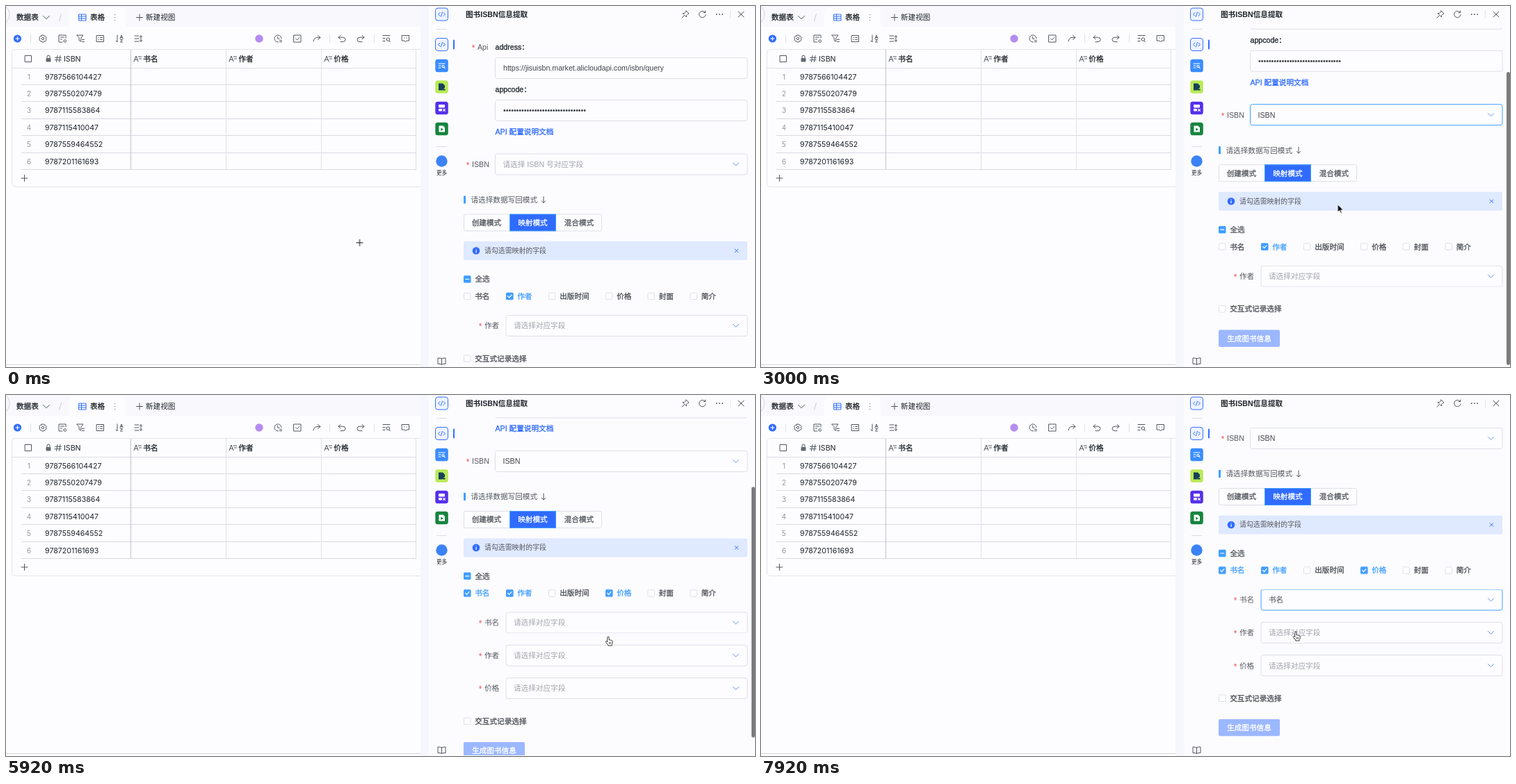
An HTML page that plays this animation: 1077 by 520 pixels, repeating every 8000 ms.

```html
<!DOCTYPE html>
<html lang="zh-CN">
<head>
<meta charset="utf-8">
<title>图书ISBN信息提取</title>
<style>
html, body { margin: 0; width: 100%; height: 100%; overflow: hidden; background: #fcfcff; }
svg { display: block; width: 1077px; height: 520px; }
text { font: 10.64px "Liberation Sans", "Noto Sans CJK SC", "Noto Sans CJK", sans-serif; color: #55585e; fill: currentColor; white-space: pre; }
.left text { font-family: Inter, "Noto Sans CJK SC", "Noto Sans CJK", sans-serif; color: #1f2329; }
.left .idx { font-size: 9.9px; color: #8f959e; }
.mid { text-anchor: middle; }
/* a thin outline gives the CJK glyphs a medium weight */
.med, .item text { stroke: currentColor; stroke-width: .3px; }
text.dark { color: #1f2329; }
text.title { color: #1f2329; font-weight: 600; }
text.link { color: #2f6bff; }
text.white { color: #fff; }
text.req { color: #f56c6c; }
text.hint { color: #a0a3aa; }
text.value { color: #404349; }
text.small { font-size: 9.88px; }
text.tiny { font-size: 7.6px; color: #1f2329; }
.box { fill: #fdfdff; stroke: #dcdfe6; }
.icon { fill: none; stroke: #51565d; stroke-linecap: round; stroke-linejoin: round; }
.blue { stroke: #3370ff; }
.pale { stroke: #fff; stroke-width: 1.2; }
.caret { fill: none; stroke: #5b8cf0; stroke-linecap: round; stroke-linejoin: round; }
.item { color: #4b4e54; }
.item text { color: inherit; }
.item.picked { color: #409eff; }
.menu { filter: drop-shadow(0 1.5px 4px rgba(0, 0, 0, .14)); }
.thumb { fill: #7b7b7e; }
</style>
</head>
<body>
<script>
const LOOP = 8000, ROW = 47.3;

// Timeline: every track becomes one CSS keyframes rule, stops are [ms, value].
const tracks = {};
let css = '', count = 0;
function track(sel, prop, stops, ease = 'step-end') {
  const name = `k${count++}`;
  const all = [...stops, [LOOP, stops[stops.length - 1][1]]];
  css += `@keyframes ${name}{${all.map(([ms, v]) => `${ms / LOOP * 100}%{${prop}:${v}}`).join('')}}\n`;
  (tracks[sel] ??= []).push(`${name} ${LOOP}ms ${ease} infinite`);
}
const shown = (sel, from, to = LOOP) =>
  track(sel, 'opacity', [[0, from ? 0 : 1], ...(from ? [[from, 1]] : []), ...(to < LOOP ? [[to, 0]] : [])]);

// Drawing helpers; text y is the middle of the line.
const text = (x, y, s, cls = '') => `<text x="${x}" y="${y + 3.9}" class="${cls}">${s}</text>`;
const rect = (x, y, w, h, fill, rx = 0, more = '') =>
  `<rect x="${x}" y="${y}" width="${w}" height="${h}" rx="${rx}" fill="${fill}" ${more}/>`;
const line = (d, stroke) => `<path d="${d}" stroke="${stroke}" fill="none"/>`;
const icon = (x, y, d, cls = '') => `<path class="icon ${cls}" transform="translate(${x} ${y})" d="${d}"/>`;
const dot = (x, y, r, fill) => `<circle cx="${x}" cy="${y}" r="${r}" fill="${fill}"/>`;
const ring = r => `M${-r} 0a${r} ${r} 0 1 0 ${2 * r} 0a${r} ${r} 0 1 0 ${-2 * r} 0`;
const frame = 'M-5-5h10v10h-10z';
const plus = 'M-4.5 0h9M0-4.5v9';

function select(x, y, name, hint, value) {
  return `<g class="${name}"><rect class="box" x="${x + .5}" y="${y - 15}" width="${1065.5 - x}" height="30" rx="3"/>
    ${text(x + 11.5, y, hint, 'hint')}${value ? text(x + 11.5, y, value, 'value') : ''}
    <g transform="translate(1049.5 ${y})"><path class="caret" d="M-4-2l4 4 4-4"/></g></g>`;
}
const input = (y, value) => rect(703.5, y - 15, 362.5, 30, '#fdfdff', 3, 'stroke="#dcdfe6"') + text(715, y, value, 'value');
const label = (x, y, s) => text(x - 8, y + 1, '*', 'req med') + text(x, y, s);
const mapRow = (y, name, s, value) =>
  `<g class="row-${name}">${label(688, y, s)}${select(718.5, y, name, '请选择对应字段', value)}</g>`;

function check(x, y, s, name = '', picked = false) {
  const tick = name || picked
    ? `<g class="tick">${rect(x, y - 5.2, 10.5, 10.5, '#409eff', 1.5)}${icon(x + 5.2, y, 'M-2.6 0l2 2 3.4-3.8', 'pale')}</g>` : '';
  return `<g class="item ${name} ${picked ? 'picked' : ''}">
    ${rect(x + .5, y - 4.7, 9.5, 9.5, '#fff', 1.5, 'stroke="#dcdfe6"')}${tick}${text(x + 16.2, y, s)}</g>`;
}

function menu(left, top, name) {
  const w = 1068 - left, x = -w / 2;
  return `<g transform="translate(${left + w / 2} ${top})"><g class="menu ${name}">
    <path d="M${x} 2q0-2 2-2h${w / 2 - 6.5}l4.5-4.5 4.5 4.5h${w / 2 - 6.5}q2 0 2 2v109.5q0 2-2 2h${4 - w}q-2 0-2-2z" fill="#fdfdff" stroke="#e4e7ed" stroke-width=".8"/>
    <rect class="hover" x="${x + .5}" y="5" width="${w - 1}" height="25.85" fill="#f4f7fc"/>
    ${['ISBN', '书名', '作者', '价格'].map((s, i) => text(x + 16, 18.2 + i * 25.85, s)).join('')}</g></g>`;
}

function sheet() {
  const isbns = [9787566104427, 9787550207479, 9787115583864, 9787115410047, 9787559464552, 9787201161693];
  const mid = i => 101.7 + i * 24.4;
  let s = rect(0, 0, 608, 31, '#f8f8fd') + rect(0, 30, 596, 490, '#fdfdff') + rect(596, 0, 12, 520, '#f6f7fc')
    + '<path d="M85 31q6 0 6-6V8q0-6 6-6h69q6 0 6 6v17q0 6 6 6z" fill="#fdfdff"/>'
    + line('M0 1q5 4 5 11t-5 12', '#d5d7dc')
    + text(15, 16.5, '数据表', 'med') + icon(58, 16.5, 'M-4.5-2.2l4.5 4.5 4.5-4.5')
    + line('M76.5 22l3-11', '#c9ccd2')
    + icon(110, 16.5, 'M-5-4.5h10v9h-10zM-5-1.5h10M-5 1.5h10M-1.5-4.5v9', 'blue') + text(121, 16.5, '表格', 'med')
    + [-4, 0, 4].map(d => dot(156.5, 16.5 + d, .8, '#8f959e')).join('')
    + icon(192, 16.5, plus) + text(201, 16.5, '新建视图');

  s += dot(16.5, 47, 5.6, '#2f6bff') + icon(16.5, 47, 'M-2.5 0h5M0-2.5v5', 'pale')
    + line('M35.5 41v12M465.5 41v12M529.5 41v12', '#dee0e3')
    + icon(53, 47, 'M-1.4-5h2.8l.6 1.4 1.5-.2 1.6 2.3-1 1.5 1 1.5-1.6 2.3-1.5-.2-.6 1.4h-2.8l-.6-1.4-1.5.2-1.6-2.3 1-1.5-1-1.5 1.6-2.3 1.5.2z' + ring(1.7))
    + icon(81, 47, 'M5-1v-4h-10v10h5M-2.5-2h5M-2.5 1h2M2 3.5a1.8 1.8 0 1 0 3.6 0a1.8 1.8 0 1 0-3.6 0')
    + icon(107, 47, 'M-5-5h9l-3.2 4.2v5l-2.6-1.4v-3.6zM2.5 1.5h3M2.5 4.5h3')
    + icon(135.5, 47, 'M-5-4.5h10v9h-10zM-2.5-1.5h.5M0-1.5h3M-2.5 1.5h.5M0 1.5h3')
    + icon(163, 47, 'M-3-5v10l-2-2M1 0l2-5 2 5M1.7-1.5h2.6M1.5 1.5h3l-3 3.5h3')
    + icon(190, 47, 'M-5-4h6M-5 0h6M-5 4h6M4-4v8M2.5-2.5l1.5-1.8 1.5 1.8M2.5 2.5l1.5 1.8 1.5-1.8')
    + dot(364, 47, 5.7, '#b58cf0')
    + icon(391, 47, 'M5-.5a5 5 0 1 0-4.5 5.4M-.3-2.8v3h2.3M2.5 2.4h3M2.5 4.6h3')
    + icon(419, 47, frame + 'M-2.5 0l2 2 3.2-3.5')
    + icon(447, 47, 'M1.5-4.5l3.5 3-3.5 3M5-1.5h-5q-4 0-5 5.5')
    + icon(483, 47, 'M-2-4.5l-3 2.7 3 2.7M-5-1.8h6q4 0 4 3.2t-4 3.2h-3')
    + icon(510, 47, 'M2-4.5l3 2.7-3 2.7M5-1.8h-6q-4 0-4 3.2t4 3.2h3')
    + icon(547, 47, 'M-5-4.5h10M-5-.5h3M-5 3.5h3M0 1a2.3 2.3 0 1 0 4.6 0a2.3 2.3 0 1 0-4.6 0M4 3l1.5 1.8')
    + icon(574.5, 47, 'M-5-4.5h10v7.5h-3.5l-1.5 1.8-1.5-1.8h-3.5zM-2-1h.3M1.7-1h.3');

  s += line('M596 62.5H14q-5.5 0-5.5 5.5v187q0 5.5 5.5 5.5h582', '#e3e5ec') + line('M8.5 89.5H590', '#dcdee6');
  for (let i = 1; i <= 6; i++) s += line(`M22 ${Math.round(89.5 + i * 24.4) - .5}H590`, '#d8dae2');
  s += line('M316.5 63v172M453.5 63v172M589.5 63v172', '#dfe1ec') + line('M179.5 63v172', '#bfc3cc')
    + icon(32, 76, 'M-4.5-4.5h9v9h-9z')
    + rect(57.5, 75, 7, 5.5, '#646a73', 1) + icon(61, 74.5, 'M-2 0v-1.5a2 2 0 0 1 4 0v1.5')
    + icon(75, 76, 'M-1-4.5l-1.5 9M3-4.5l-1.5 9M-4.5-1.7h9M-4.8 1.7h9') + text(83, 76, 'ISBN');
  ['书名', '作者', '价格'].forEach((name, i) => {
    const x = 184 + i * 137;
    s += icon(x, 76, 'M0 4l3-8 3 8M1 1.2h4M6-3h4.5M7.5 0h3') + text(x + 13.3, 76, name, 'med');
  });
  isbns.forEach((n, i) => s += text(33, mid(i), i + 1, 'idx mid') + text(56, mid(i), n));
  return s + icon(26.5, 248, plus) + line('M0 516.5H596', '#d6d6da');
}

function sidebar() {
  const code = y => rect(617.5, y - 9, 18, 18, '#eff4ff', 3.5, 'stroke="#3370ff"')
    + icon(626.5, y, 'M-2.5-2.5l-2.5 2.5 2.5 2.5M2.5-2.5l2.5 2.5-2.5 2.5M1-3.2l-2 6.4', 'blue');
  const tile = (y, fill) => rect(617.3, y - 9.2, 18.5, 18.5, fill, 3.5);
  return code(12) + line('M619 33.5h15M619 202.5h15', '#dcdee3') + code(55.5) + rect(643, 48.5, 2, 14, '#3370ff', 1)
    + tile(86, '#3a8cff') + icon(626.5, 86, 'M-4.5-3h9M-4.5 0h3M-4.5 3h3M.5 1a1.5 1.5 0 1 0 3 0a1.5 1.5 0 1 0-3 0M3.5 2.5l1.2 1.2', 'pale')
    + tile(116.5, '#b9ea57') + '<path d="M622 111.5h6l3 3v3l-4 4h-5z" fill="#17405a"/>' + rect(628, 119.5, 3.5, 2, '#17405a')
    + tile(147, '#5530ea') + rect(622, 142, 9, 4.5, '#fff', 1) + rect(622, 148, 5, 3.5, '#fff', 1) + icon(630, 150, 'M-1.4-1.4l2.8 2.8M-1.4 1.4l2.8-2.8', 'pale')
    + tile(177, '#17853f') + '<path d="M622.5 172.5h6l2.5 2.5v6.5h-8.5z" fill="#fff"/><path d="M625.3 175.5l3.6 2.2-3.6 2.2z" fill="#17853f"/>'
    + dot(626.5, 223.5, 8.2, '#3b82f6') + text(626.5, 239.5, '更多', 'tiny mid')
    + icon(626.5, 511.5, 'M0-3.5q-2-1.2-5.5-1v8.5q3.5-.2 5.5 1 2-1.2 5.5-1v-8.5q-3.5-.2-5.5 1zM0-3.5v8.5');
}

function header() {
  return text(661, 12, '图书ISBN信息提取', 'title')
    + icon(977, 12, 'M1-5l4 4-1.5.5-2 2v2.500l-5.500-5.500h2.500l2-2zM-2 2l-3 3')
    + icon(1001.5, 12, 'M3.6-3a4.700 4.700 0 1 0 1 3.800M4.200-5v2.600h-2.600')
    + [-4.2, 0, 4.2].map(d => dot(1026 + d, 12, .9, '#51565d')).join('')
    + line('M1041.5 6v12', '#e4e6ea') + icon(1057, 12, 'M-4-4l8 8M-4 4l8-8');
}

function page() {
  return label(678, 59, 'Api') + text(703.5, 59, 'address：', 'dark med') + input(89.5, 'https://jisuisbn.market.alicloudapi.com/isbn/query')
    + text(703.5, 120, 'appcode：', 'dark med') + input(150.5, '•'.repeat(32))
    + text(703.5, 181, 'API 配置说明文档', 'link med')
    + label(670, 228, 'ISBN') + select(703, 228, 'isbn', '请选择 ISBN 号对应字段', 'ISBN')
    + rect(658, 273.5, 3, 11, '#409eff') + text(668.5, 279, '请选择数据写回模式') + icon(773, 279, 'M0-4.5v9M-2.7 1.8l2.7 2.7 2.7-2.7')
    + rect(658.5, 300, 198, 24, '#fdfdff', 2, 'stroke="#dcdfe6"') + rect(724.5, 300, 66, 24, '#2f6bff', 0, 'stroke="#409eff"')
    + text(691, 312, '创建模式', 'mid med') + text(757.5, 312, '映射模式', 'mid white med') + text(824, 312, '混合模式', 'mid med')
    + rect(658, 339, 408, 27, '#dfe9ff', 2) + dot(676, 352.5, 5.3, '#2f6bff') + icon(676, 352.5, 'M0-2.5v.1M0-.3v2.8', 'pale')
    + text(688, 352, '请勾选需映射的字段', 'small') + icon(1050.5, 352.5, 'M-2.3-2.3l4.6 4.6M-2.3 2.3l4.6-4.6', 'blue')
    + rect(658, 388.2, 10.5, 10.5, '#409eff', 1.5) + icon(663.2, 393.5, 'M-2.5 0h5', 'pale') + text(674.5, 393.5, '全选', 'med')
    + check(658, 418, '书名', 'pick-title') + check(719, 418, '作者', '', true) + check(780, 418, '出版时间')
    + check(862, 418, '价格', 'pick-price') + check(922.5, 418, '封面') + check(983.5, 418, '简介')
    + mapRow(460.5, 'title', '书名', '书名') + mapRow(460.5, 'author', '作者') + mapRow(460.5 + 2 * ROW, 'price', '价格')
    + `<g class="foot">${check(658, 507.6, '交互式记录选择')}${rect(658, 537.9, 88, 24.3, '#9bb7ff', 2)}${text(702, 550.2, '生成图书信息', 'mid white med')}</g>`
    + menu(703.5, 252.5, 'menu-isbn') + menu(719, 485.5, 'menu-title');
}

const cursor = `<g class="cursor">
  <path class="cross" d="M-5 0h10M0-5v10" stroke="#111" fill="none"/>
  <path class="arrow" d="M0 0v11l2.6-2.4 1.8 4 1.6-.7-1.7-3.9h3.5z" fill="#000" stroke="#fff" stroke-width=".8"/>
  <path class="hand" d="M-1.3 7.8V1.3a1.2 1.2 0 0 1 2.4 0V4.8q1.1-.5 1.8.3 1-.4 1.700.4 1.300-.1 1.500 1.200V9q0 1.500-1 2.600V13H-.2v-1L-3.400 8.200q-.8-1.100.2-1.600.8-.4 1.900.8zM1.500 8v2.500M3.300 8v2.500" fill="#fff" stroke="#222" stroke-width=".9" stroke-linejoin="round"/>
</g>`;

document.body.innerHTML = `<svg viewBox="0 0 1077 520">
  <clipPath id="view"><rect x="647" y="31.5" width="430" height="487.5"/></clipPath>
  ${rect(0, 0, 1077, 520, '#fcfcff')}
  <g class="left">${sheet()}</g>${sidebar()}${header()}
  <g clip-path="url(#view)"><g class="page">${page()}</g></g>
  <rect class="thumb short" x="1072" y="33" width="5" height="422" rx="2.5"/>
  <rect class="thumb long" x="1072" y="33" width="5" height="361" rx="2.5"/>
  ${cursor}</svg>`;

// Scrolling and its bars
const scroll = [[0, 0], [2495, 14.4], [2580, 48], [2660, 71.3], [5825, 98], [5912, 132.6], [6000, 151], [6080, 161], [6160, 165.5]];
track('.page', 'translate', scroll.map(([ms, y]) => [ms, `0 ${-y}px`]));
track('.short', 'translate', scroll.slice(0, 4).map(([ms, y]) => [ms, `0 ${y * .87}px`]));
track('.long', 'translate', [[0, '0 0'], ...scroll.slice(4).map(([ms, y]) => [ms, `0 ${y * .749}px`])]);
track('.short', 'opacity', [[0, 0], [2494, 0], [2495, 1], [3080, 1], [3400, 0]], 'linear');
track('.long', 'opacity', [[0, 0], [5824, 0], [5825, 1], [6750, 1], [7080, 0]], 'linear');

// Ticked boxes and the rows they add
const TITLE = 3575, PRICE = 5250;
for (const [name, ms] of [['title', TITLE], ['price', PRICE]]) {
  track(`.pick-${name}`, 'color', [[0, '#4b4e54'], [ms, '#409eff']]);
  shown(`.pick-${name} .tick`, ms);
  shown(`.row-${name}`, ms);
}
track('.row-author', 'translate', [[0, '0 0'], [TITLE, `0 ${ROW}px`]]);
track('.foot', 'translate', [[0, '0 0'], [TITLE, `0 ${ROW}px`], [PRICE, `0 ${2 * ROW}px`]]);

// Selects with their menus
function choose(name, open, pick, blur) {
  track(`.${name} .box`, 'stroke', [[0, '#dcdfe6'], [open, '#409eff'], ...(blur ? [[blur, '#dcdfe6']] : [])]);
  shown(`.${name} .hint`, 0, pick);
  shown(`.${name} .value`, pick);
  const swing = (a, b) => [[0, a], [open, a], [open + 230, b], [pick, b], [pick + 260, a]];
  track(`.${name} .caret`, 'rotate', swing('0deg', '-180deg'), 'linear');
  track(`.menu-${name}`, 'opacity', swing(0, 1), 'ease-out');
  track(`.menu-${name}`, 'scale', swing('1 0', '1 1'), 'ease-out');
}
choose('isbn', 1170, 1920, TITLE);
choose('title', 6665, 7415);
shown('.menu-isbn .hover', 1540);
shown('.menu-title .hover', 6920);
track('.menu-title .hover', 'translate', [[0, '0 0'], [7040, '0 25.85px']]);

// Pointer
const path = [[0, 508.5, 341], [480, 508.5, 341], [1120, 771, 243], [1440, 771, 243], [1580, 757, 271], [1940, 757, 271],
  [2250, 847, 279], [2880, 847, 279], [3420, 675, 346], [3600, 675, 346], [3910, 751, 348], [4000, 751, 348], [4330, 801, 349],
  [4420, 801.5, 349.5], [4800, 801.5, 349.5], [5170, 866, 348], [6160, 866, 348], [6560, 777, 297], [6840, 777, 297],
  [7130, 777, 362], [7480, 777, 362], [7900, 769, 341]];
track('.cursor', 'translate', path.map(([ms, x, y]) => [ms, `${x}px ${y}px`]), 'ease-in-out');
shown('.cross', 0, 250);
track('.arrow', 'opacity', [[0, 0], [250, 1], [1080, 0], [1560, 1], [1750, 0], [2080, 1], [3330, 0]]);
track('.hand', 'opacity', [[0, 0], [1080, 1], [1560, 0], [1750, 1], [2080, 0], [3330, 1]]);

const style = document.createElement('style');
style.textContent = css + Object.entries(tracks).map(([sel, list]) => `${sel}{animation:${list.join(',')}}`).join('\n');
document.head.append(style);
</script>
</body>
</html>
```
